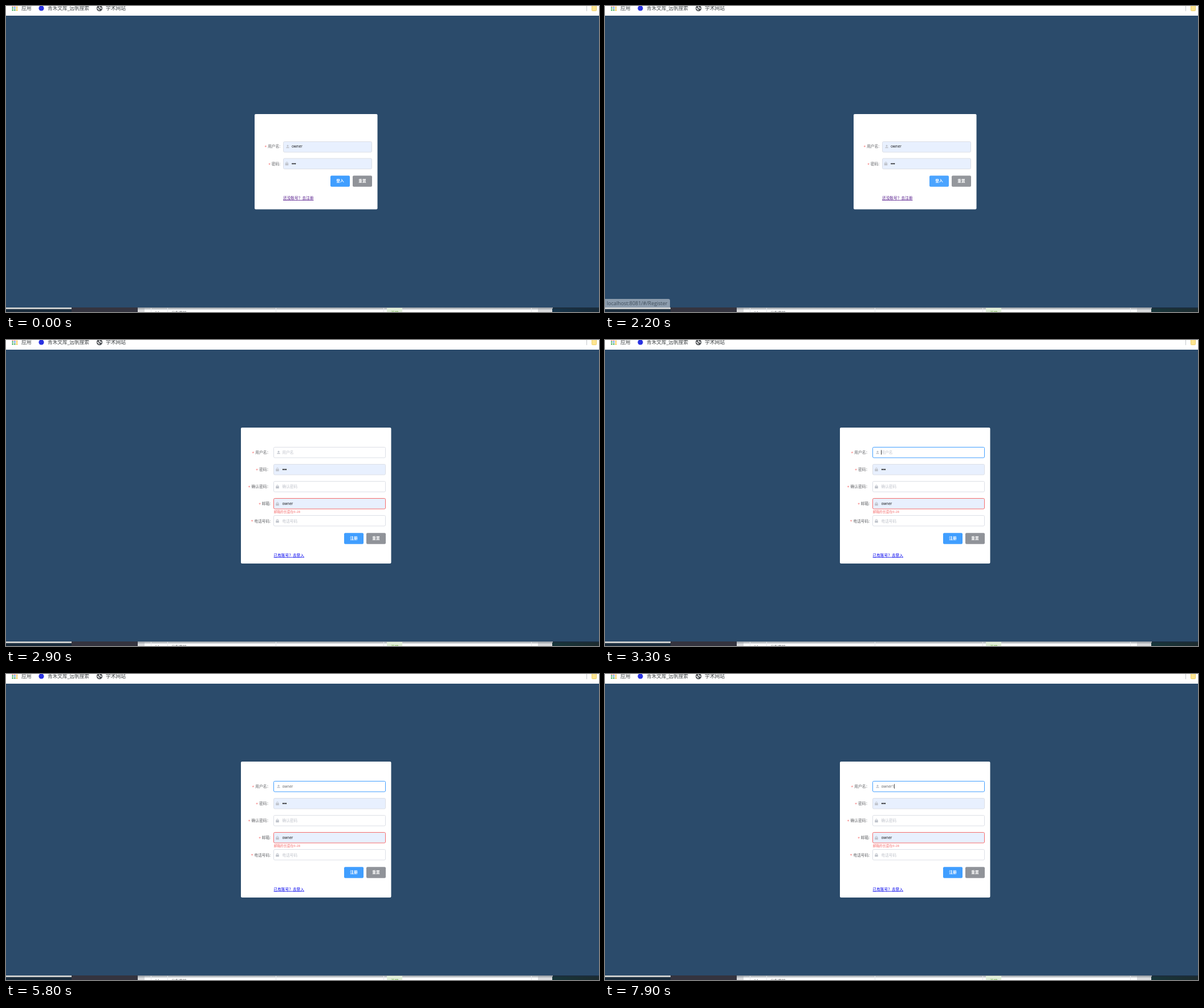
An HTML page with a canvas that plays this animation: 1040 by 538 pixels, repeating every 8000 ms.

```html
<!DOCTYPE html>
<html lang="zh-CN">
<head>
<meta charset="utf-8">
<style>
html, body { margin: 0; width: 1040px; height: 538px; overflow: hidden; }
canvas { display: block; }
</style>
</head>
<body>
<canvas id="stage" width="1040" height="538"></canvas>
<script>
const c = document.getElementById('stage').getContext('2d');
const LOOP = 8000, SIZE = 6.7, USER = 'owner';
const FAMILY = '"Open Sans", "Noto Sans CJK SC", "Noto Sans CJK", sans-serif';
const BLUE = '#409eff', GREY = '#909399', RED = '#f56c6c';
const LINE = '#dcdfe6', HOVER = '#c0c4cc', AUTOFILL = '#e8f0fe';

// Last value whose start time has been reached
const at = (t, steps) => steps.filter(s => s[0] <= t).pop()[1];
const within = (t, from, to) => t >= from && t < to;

function rect(x, y, w, h, fill) {
  c.fillStyle = fill;
  c.fillRect(x, y, w, h);
}
function round(x, y, w, h, r, fill, stroke) {
  c.beginPath();
  c.roundRect(x, y, w, h, r);
  c.fillStyle = fill;
  c.fill();
  if (stroke) { c.strokeStyle = stroke; c.lineWidth = 1; c.stroke(); }
}
function disc(x, y, r, fill) {
  c.beginPath();
  c.arc(x, y, r, 0, 7);
  c.fillStyle = fill;
  c.fill();
}
// Text centred vertically on cy; returns its width
function text(str, x, cy, fill, size = SIZE, align = 'left', weight = 400) {
  c.font = `${weight} ${size}px ${FAMILY}`;
  c.textAlign = align;
  c.fillStyle = fill;
  c.fillText(str, x, cy + size * 0.36);
  return c.measureText(str).width;
}

function userIcon(x, y) {
  disc(x, y - 1.2, 1.5, HOVER);
  round(x - 2.8, y + 0.9, 5.6, 1.8, [1.5, 1.5, 0, 0], HOVER);
}
function lockIcon(x, y) {
  round(x - 2.8, y - 0.7, 5.6, 3.9, 0.5, HOVER);
  c.beginPath();
  c.arc(x, y - 1, 1.7, Math.PI, 0);
  c.strokeStyle = HOVER;
  c.lineWidth = 1;
  c.stroke();
}
function dots(x, y, r, gap) {
  for (let i = 0; i < 3; i++) disc(x + i * gap, y, r, '#111');
}
function label(str, right, cy) {
  const w = text(str, right, cy, '#606266', SIZE, 'right');
  text('*', right - w - 2, cy + 0.8, RED, SIZE, 'right');
}
function button(str, x, y, fill) {
  round(x, y, 34, 19.5, 2, fill);
  text(str, x + 17, y + 9.6, '#fff', SIZE, 'center', 700);
}
function link(str, x, cy, color) {
  const w = text(str, x, cy, color);
  rect(x, cy + 3.2, w, 0.8, color);
}
function field(x, y, w, border = LINE, fill = '#fff') {
  round(x + 0.5, y + 0.5, w - 1, 18.5, 2, fill, border);
}
function caret(x, cy) {
  rect(Math.round(x), cy - 4, 1, 8, '#444');
}

function bookmarks() {
  rect(0, 0, 1040, 17, '#fff');
  const colors = ['#e8453c', '#e8453c', '#f9bb2d', '#3aa757', '#4688f1', '#f9bb2d', '#3aa757', '#3aa757', '#f9bb2d'];
  colors.forEach((col, i) => rect(10.5 + i % 3 * 3.7, -1.5 + Math.floor(i / 3) * 3.7, 2.4, 2.4, col));
  text('应用', 27, 4, '#3c4043', 8.8);
  disc(62, 4, 4.6, '#2932e1');
  text('青禾文库_远帆搜索', 73, 4, '#3c4043', 8.65);
  disc(164, 4, 5.2, '#54575b');
  c.strokeStyle = '#fff';
  c.lineWidth = 1.5;
  c.beginPath();
  c.moveTo(160, 4); c.quadraticCurveTo(164, 5, 163, 7.5);
  c.moveTo(164, 0.5); c.quadraticCurveTo(163, 4, 168, 4);
  c.stroke();
  text('学术网站', 175, 4, '#3c4043', 8.75);
  rect(1018, 0, 1, 9, '#c4c7ca');
  round(1027.5, -2.5, 8, 11, 1, '#fee591', '#ecd06c');
}

function desktop(t) {
  const later = t >= 2200;
  rect(0, 530, 1040, 8, '#1b2d3d');
  rect(0, 530, 115, 3, '#c9cbcb');
  rect(115, 530, 116, 8, '#34343f');
  rect(231, 530, 728, 8, '#dcdddf');
  rect(243, 530, 690, 8, '#fff');
  const shade = c.createLinearGradient(0, 530, 0, 535);
  shade.addColorStop(0, '#8a929a');
  shade.addColorStop(1, '#8a929a00');
  rect(231, 530, 728, 5, shade);
  [254, 283, 473, 662, 921].forEach(x => rect(x, 531, 1, 7, '#e6e8ec'));
  text('11', 261, 539.5, '#606266', 7.5);
  text('分批发放', 290, 539.5, '#606266', SIZE);
  rect(668, 531, 27, 7, '#e1eed9');
  text('正常', 675, 539.5, '#67a83a', SIZE);
  const dusk = c.createLinearGradient(958, 0, 1040, 0);
  dusk.addColorStop(0, later ? '#17363b' : '#16344a');
  dusk.addColorStop(1, later ? '#1d2b2f' : '#172a38');
  rect(958, 532, 82, 6, dusk);
}

function login(t) {
  round(436, 190, 215.5, 167.5, 2, '#fff');
  label('用户名:', 481, 247);
  label('密码:', 481, 277.3);
  field(486, 238, 156, LINE, AUTOFILL);
  field(486, 267.5, 156, LINE, AUTOFILL);
  userIcon(494, 247);
  lockIcon(492.5, 277);
  text(USER, 501, 247, '#111', 6.4);
  dots(502.3, 277.3, 1.1, 2.5);
  button('登入', 569, 298.3, at(t, [[0, BLUE], [800, '#53a8ff'], [900, '#66b1ff'], [1400, '#58aaff'], [1500, '#4ba4ff']]));
  button('重置', 608, 298.3, at(t, [[0, GREY], [800, '#9b9ea3'], [900, GREY], [1400, '#9b9ea3'], [1500, '#a6a9ad'], [1700, '#94979c']]));
  link('还没账号？去注册', 486, 338, '#551a8b');
}

function register(t) {
  const filled = t >= 2800, wrong = t >= 2900;
  const typed = at(t, [[0, 0], [3500, 1], [3700, 2], [3900, 3], [4000, 4], [4200, 5], [7900, 6]]);
  const borders = [
    at(t, [[0, LINE], [3100, HOVER], [3200, BLUE], [6300, '#8ebff3'], [6400, LINE], [7500, '#8ebff3'], [7600, BLUE]]),
    at(t, [[0, LINE], [6000, HOVER], [6300, BLUE], [7200, '#8ebff3'], [7300, LINE]]),
    at(t, [[0, LINE], [5400, HOVER], [5800, LINE]]),
    wrong ? RED : LINE,
    LINE
  ];
  const names = ['用户名', '密码', '确认密码', '邮箱', '电话号码'];

  round(412, 154, 263.5, 239, 2, '#fff');
  names.forEach((name, i) => {
    const y = 187.7 + i * 30.15, cy = y + 9.8;
    const auto = filled && (i === 1 || i === 3);
    label(name + (i < 3 ? '：' : ':'), 464, cy);
    field(469, Math.round(y), 197, borders[i], auto ? AUTOFILL : '#fff');
    if (i) lockIcon(476, cy); else userIcon(478, cy);
    if (auto && i === 1) dots(486, cy, 1.1, 2.5);
    else if (auto) text(USER, 484.5, cy, '#111', 6.4);
    else if (i || !typed) text(name, 484.5, cy, HOVER);
  });

  const w = typed ? text((USER + '1').slice(0, typed), 484.5, 197.5, '#606266', 6.4) : 0;
  const blink = [[3300, 4600], [5100, 5600], [6100, 6300], [7500, LOOP]];
  if (blink.some(([a, b]) => within(t, a, b))) caret(484.2 + w, 197.5);
  if (within(t, 6300, 6900)) caret(492, 227.6);

  if (wrong) text('邮箱的长度在6-28', 469.5, 302.3, RED, 5.8);
  button('注册', 593, 339.2, BLUE);
  button('重置', 632, 339.2, GREY);
  link('已有账号？去登入', 469.5, 378.5, '#0000ee');
}

function passwordMenu() {
  c.shadowColor = 'rgba(0,0,0,.35)';
  c.shadowBlur = 3;
  c.shadowOffsetY = 1;
  rect(469, 238, 197, 83.5, '#fff');
  c.shadowColor = 'transparent';
  rect(469, 278, 197, 19, '#f6f6f6');
  rect(469, 292, 197, 1, '#d4d4d4');
  rect(478, 259, 10, 10, '#41b883');
  text(USER, 498, 257.5, '#222', 9.4);
  dots(500, 273, 1.7, 4.1);
  text('管理密码...', 477.5, 306, '#222', 9.3);
}

function statusBubble() {
  c.globalAlpha = 0.55;
  round(0, 515, 114, 16, [0, 3, 0, 0], '#dee1e6');
  c.globalAlpha = 1;
  text('localhost:8081/#/Register', 3, 522.7, '#3f4d5a', 8.95);
}

function draw(t) {
  rect(0, 0, 1040, 538, '#2b4b6b');
  bookmarks();
  desktop(t);
  if (t < 2300) login(t); else register(t);
  if (within(t, 2200, 2400)) statusBubble();
  c.globalAlpha = at(t, [[0, 0], [6400, 0.6], [6500, 1], [7200, 0.4], [7300, 0]]);
  if (c.globalAlpha) passwordMenu();
  c.globalAlpha = 1;
}

const start = performance.now();
function tick() {
  draw((performance.now() - start) % LOOP);
  requestAnimationFrame(tick);
}
tick();
</script>
</body>
</html>
```
